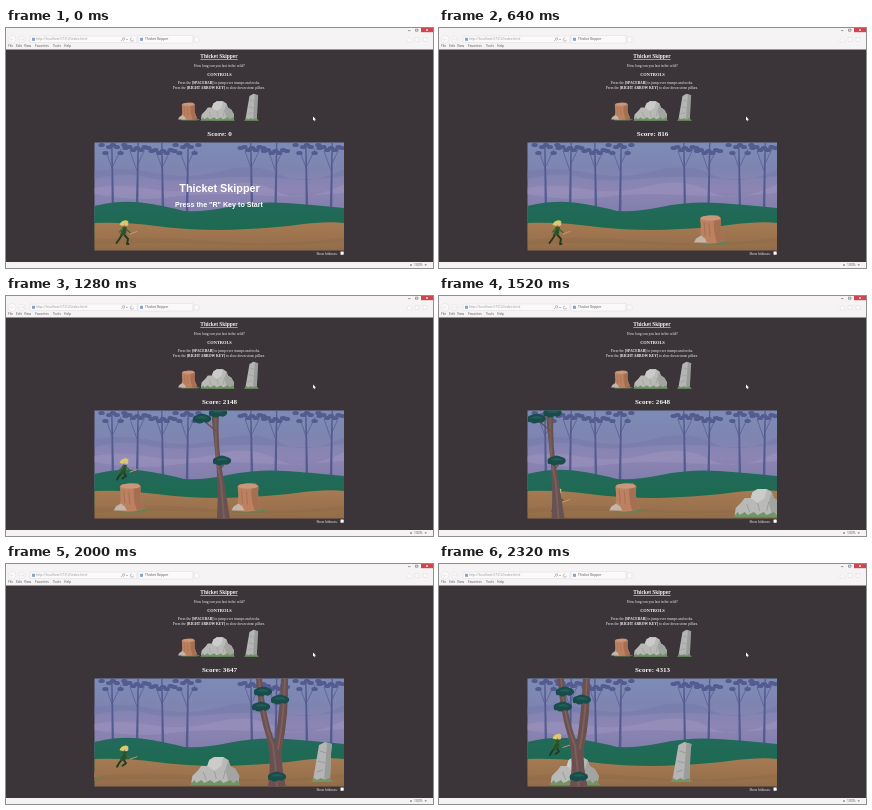
An HTML page that plays this animation: 427 px wide and 240 px high, repeating every 2400 ms.

```html
<!DOCTYPE html>
<html lang="en">
<head>
<meta charset="utf-8">
<title>Thicket Skipper</title>
<style>
html, body { margin: 0; height: 100%; overflow: hidden; background: #3b3539; }
svg { display: block; width: 100vw; height: 100vh; }
.page { font-family: "Liberation Serif", serif; fill: #f4f2f3; text-anchor: middle; font-size: 3.65px; }
.page .b { font-weight: bold; }
.ui { font: 3.3px "Open Sans", sans-serif; fill: #555; }
.big { font: bold 10.8px "Liberation Sans", sans-serif; fill: #fff; text-anchor: middle; }
.big .sub { font-size: 7.13px; }
</style>
</head>
<body>
<svg viewBox="0 0 427 240">
  <defs>
    <linearGradient id="sky" x2="0" y2="1">
      <stop offset="0" stop-color="#7c8cb6"/>
      <stop offset=".35" stop-color="#7f84b1"/>
      <stop offset=".6" stop-color="#8d85b4"/>
      <stop offset=".85" stop-color="#827fad"/>
    </linearGradient>
    <linearGradient id="hill" x2="0" y2="1">
      <stop offset="0" stop-color="#23695c"/>
      <stop offset=".7" stop-color="#1d6a50"/>
    </linearGradient>
    <linearGradient id="soil" x2="0" y2="1">
      <stop offset="0" stop-color="#a67b53"/>
      <stop offset="1" stop-color="#926c49"/>
    </linearGradient>
    <clipPath id="view"><rect x="88.5" y="114.5" width="249.5" height="108"/></clipPath>

    <!-- Obstacles stand on y = 0, centred on x = 0 -->
    <g id="stump">
      <path d="M-12-1Q4-4 20-1L14 1H-10Z" fill="#678153"/>
      <path d="M-11-1Q-8-12-10-25Q-4-29 8-28L11-25Q9-11 15-3Q2 2-11-1Z" fill="#bb8160"/>
      <path d="M4-24L11-25Q9-11 15-3L7-1Q3-12 4-24Z" fill="#a66f52"/>
      <ellipse cx=".5" cy="-25.3" rx="10" ry="2.6" fill="#cb977a"/>
      <path d="M-6-21L-5-8M-1-20L0-7" stroke="#a06c50" stroke-width=".8" fill="none"/>
      <path d="M-16-1L-14-5L-9-8L-5-5L-3-1Z" fill="#c3b5ab"/>
    </g>
    <g id="rocks">
      <path d="M-24-1L-23-8L-17-14L-14-18L-8-18L-6-24L-1-27L8-27L13-24L15-18L20-15L24-8L23-1Q0 2-24-1Z" fill="#b9b9b8"/>
      <path d="M-6-24L-1-27L8-27L6-18L-1-13L-8-18Z" fill="#cbcbc9"/>
      <path d="M13-24L15-18L20-15L24-8L23-1L13-2L10-14Z" fill="#a2a4a2"/>
      <path d="M-12-12L-9-4M-1-13L1-5M10-14L8-5" stroke="#979996" stroke-width=".8" fill="none"/>
      <path d="M-25 1l4-5 2 3 5-3 3 3 6-3 4 3 6-3 3 3 7-3 3 3 4-3 3 5Z" fill="#729566"/>
    </g>
    <g id="pillar">
      <path d="M-9-1L-3-36L3-39L10-37L9-28L8-1Q-1 1-9-1Z" fill="#b4b5b4"/>
      <path d="M5-38L10-37L9-28L8-1L2 0Z" fill="#9b9d9b"/>
      <path d="M-2-30L4-28M-4-20L3-18M-5-9L1-11" stroke="#929492" stroke-width=".8" fill="none"/>
      <path d="M-11 1l3-4 3 2 4-2 4 2 4-2 4 4Z" fill="#729566"/>
    </g>
    <g id="leaf" fill="#194d4c">
      <path d="M-9 1Q-10-3-5-4Q0-7 5-4Q10-3 9 1Q6 5 2 3Q-3 6-6 3Q-9 4-9 1Z"/>
      <path d="M-6-1Q0-5 6-1Q1 0-6-1Z" fill="#216056"/>
    </g>
  </defs>

  <rect width="427" height="240" fill="#3b3539"/>

  <!-- Browser window -->
  <rect width="427" height="21.5" fill="#f6f3f5"/>
  <rect x="415" width="12" height="4.2" fill="#d0464e"/>
  <path d="M420 1l2 2m0-2l-2 2" stroke="#fff" stroke-width=".6"/>
  <path d="M402 2.6h2.5M409.5 1.2h2.4v2h-2.4Z" stroke="#77727a" stroke-width=".7" fill="none"/>
  <g fill="#fbf9fa" stroke="#dedade" stroke-width=".5">
    <circle cx="6" cy="11.3" r="4"/><circle cx="16" cy="11.3" r="3.2"/>
    <path d="M24 8H131V14.5H24ZM132 7.5H187V15H132ZM188 9h5v5h-5Z"/>
    <path d="M8 11.3H4l1.6-1.6M4 11.3l1.6 1.6M14 11.3h4l-1.4-1.4M18 11.3l-1.4 1.4M401 12l2.5-2.5 2.5 2.5v2h-5ZM409 9.5h4v4h-4ZM417 9.5h4v4h-4Z"/>
    <path d="M115 13l1.5-1.5a1.2 1.2 0 1 1 .4.4M120 11l1 1 1-1M126 10a1.6 1.6 0 1 0 1.5 1.6" stroke="#86838a"/>
  </g>
  <rect x="26" y="9.8" width="3" height="3" fill="#86a5c6"/>
  <rect x="134" y="9.8" width="3" height="3" fill="#86a5c6"/>
  <g class="ui">
    <text x="30" y="12.4" fill="#999">http://localhost:57312/index.html</text>
    <text x="139" y="12.4">Thicket Skipper</text>
    <text x="2" y="19.3">File</text><text x="10" y="19.3">Edit</text><text x="18" y="19.3">View</text>
    <text x="29" y="19.3">Favorites</text><text x="47" y="19.3">Tools</text><text x="58" y="19.3">Help</text>
  </g>
  <rect y="234" width="427" height="6" fill="#f4f2f3"/>
  <circle cx="405" cy="237" r="1" fill="#8e949a"/>
  <text class="ui" x="408" y="238.3">100%</text>
  <path d="M418.5 236.5h2.4l-1.2 1.3Z" fill="#555"/>

  <!-- Page -->
  <g class="page">
    <text class="b" x="213" y="30.3" font-size="5.4" text-decoration="underline">Thicket Skipper</text>
    <text x="213.5" y="39">How long can you last in the wild?</text>
    <text class="b" x="213.5" y="48.3" font-size="4.4">CONTROLS</text>
    <text x="213" y="56.3">Press the <tspan class="b">[SPACEBAR]</tspan> to jump over stumps and rocks.</text>
    <text x="213" y="60.8">Press the <tspan class="b">[RIGHT ARROW KEY]</tspan> to slow down stone pillars.</text>
    <text class="b" id="score" x="213.5" y="107.8" font-size="7.1">Score: 0</text>
    <text x="321" y="226.5" font-size="3.4">Show hitboxes:</text>
  </g>
  <rect x="334.5" y="223.5" width="3.2" height="3.2" rx=".5" fill="#fff"/>
  <use href="#stump" transform="translate(182 92) scale(.62)"/>
  <use href="#rocks" transform="translate(211.5 92) scale(.69)"/>
  <use href="#pillar" transform="translate(245.5 92) scale(.67)"/>
  <path d="M307 88.5v4l1-.8.8 1.6.6-.3-.7-1.5h1.3Z" fill="#fff"/>

  <!-- Game -->
  <g clip-path="url(#view)">
    <rect x="88" y="114" width="251" height="80" fill="url(#sky)"/>
    <path d="M88 143Q120 138 150 145T215 143T275 147T339 141V148Q300 153 270 150T200 151T140 149T88 151Z" fill="#757ba9" opacity=".5"/>
    <path d="M88 160Q115 155 145 161T210 158T270 163T339 156V165Q290 170 245 167T165 169T88 166Z" fill="#9f95c0" opacity=".5"/>
    <g id="woods" fill="#545b8f" stroke="#545b8f"></g>
    <path d="M88 178Q112 172 135 174.5Q160 178 178 183Q200 184 222 179Q250 173 280 175Q310 177 339 180V212H88Z" fill="url(#hill)"/>
    <path d="M88 195Q120 194 150 198T215 202Q260 201 290 197T339 195V223H88Z" fill="url(#soil)"/>
    <path d="M88 212Q145 207 205 213T339 210V214Q275 219 205 216T88 217Z" fill="#8c6848" opacity=".4"/>
    <g id="obstacles"></g>
    <g id="hero" stroke-linecap="round" stroke-linejoin="round" fill="none">
      <path id="legs" stroke="#24391f" stroke-width="1.9"/>
      <path d="M117.5 199L120.5 199.5L119.5 206L114.5 208Z" fill="#2a5228" stroke="#2a5228" stroke-width=".8"/>
      <path d="M117 200.5L113.5 204M120 201L124 204.5" stroke="#3b6a36" stroke-width="1.4"/>
      <path d="M124 206L131 203.5" stroke="#d59680" stroke-width=".9"/>
      <circle cx="120.3" cy="196" r="2.1" fill="#e0bb93"/>
      <path d="M113.5 197Q115 192.5 119.5 192.2Q122.5 192.4 122.5 194.5L119.3 195.2L117.5 198Z" fill="#dccb62"/>
    </g>
    <g id="tree1">
      <path d="M-9-109H-1Q-3-70 4-38L10 0H-3Q-1-35-5-67Z" fill="#685153"/>
      <path d="M-4-109Q-6-68 1-37L4 0" stroke="#795f59" stroke-width="2" fill="none"/>
      <path d="M-4-88L-17-99M0-50L7-58" stroke="#685153" stroke-width="1.6"/>
      <use href="#leaf" x="-18" y="-100"/><use href="#leaf" x="-2" y="-106"/><use href="#leaf" x="2" y="-58"/>
    </g>
    <g id="tree2">
      <path d="M-19-109H-13Q-10-70 0-45Q5-78 6-109H13Q14-72 7-38Q6-20 11 0H-7Q-3-25-8-48Q-17-75-19-109Z" fill="#6a5050"/>
      <path d="M-16-109Q-12-65-2-42Q1-20 2 0M10-109Q9-70 3-38" stroke="#7e605a" stroke-width="1.8" fill="none"/>
      <use href="#leaf" x="-12" y="-95"/><use href="#leaf" x="5" y="-87"/>
      <use href="#leaf" x="-14" y="-80"/><use href="#leaf" x="2" y="-10"/>
    </g>
    <g id="intro" class="big">
      <text x="213.5" y="163.5">Thicket Skipper</text>
      <text class="sub" x="213" y="179.4">Press the "R" Key to Start</text>
    </g>
  </g>
</svg>
<script>
const LOOP = 2400, STEP = 80, START = 240;
const el = id => document.getElementById(id);
const place = (node, x, y) => node.setAttribute("transform", `translate(${x} ${y})`);

// Distant trees: a thin tapering trunk, two boughs and a ragged crown
el("woods").innerHTML = [107, 131, 157, 181, 246, 269.5, 301, 325].map((x, i) => {
  const lean = i % 2 ? 1.2 : -1.2;
  let s = `<path d="M${x + lean - .6} 114L${x - 1.3} 184H${x + 1.3}L${x + lean + .6} 114Z" stroke="none"/>
    <path d="M${x} 143L${x - 7} 123M${x} 138L${x + 8} 121" fill="none" stroke-width=".7"/>`;
  for (let k = -3; k <= 3; k++)
    s += `<ellipse cx="${x + k * 3.8}" cy="${117 + (i * 3 + k * k * 2) % 9}" rx="3.2" ry="2" stroke="none"/>`;
  return s;
}).join("");

// Each obstacle: shape, x at the time given, baseline
const obstacles = [
  ["stump", 271, 640, 215.5],
  ["stump", 241.5, 1280, 215.5],
  ["rocks", 264.5, 1760, 220],
  ["pillar", 316, 2000, 217]
].map(([shape, x, at, y]) => {
  const node = document.createElementNS("http://www.w3.org/2000/svg", "use");
  node.setAttribute("href", "#" + shape);
  el("obstacles").append(node);
  return { node, x, at, y };
});

const jumpHeight = t => Math.max(0, ...[1290, 1840, 2420].map(peak => 30 * (1 - ((t - peak) / 200) ** 2)));

function draw(t) {
  const running = t >= START;
  el("intro").style.display = running ? "none" : "";
  el("score").textContent = "Score: " + Math.max(0, Math.round(816 + 2.0815 * (t - 640)));

  for (const o of obstacles) place(o.node, o.x - 0.23 * (t - o.at), o.y);
  place(el("tree1"), 214 - 0.41 * (t - 1280), 223);
  place(el("tree2"), 269 - 0.41 * (t - 2000), 223);

  const up = jumpHeight(t);
  const stride = running ? Math.cos(t / STEP * Math.PI / 8) ** 2 : 1;
  place(el("hero"), 0, -up);
  el("legs").setAttribute("d", up
    ? "M115.5 207L113 210L111 213.5M118 207L120 210L116.5 212.5"
    : `M116 207L${115 - 2 * stride} 211.5L${114 - 3.5 * stride} 215M118.5 207L${120 + 2 * stride} 211L${119 + 2 * stride} 216h1.5`);
}

function frame(now) {
  draw(Math.floor(now % LOOP / STEP) * STEP);
  requestAnimationFrame(frame);
}
draw(0);
requestAnimationFrame(frame);
</script>
</body>
</html>
```
